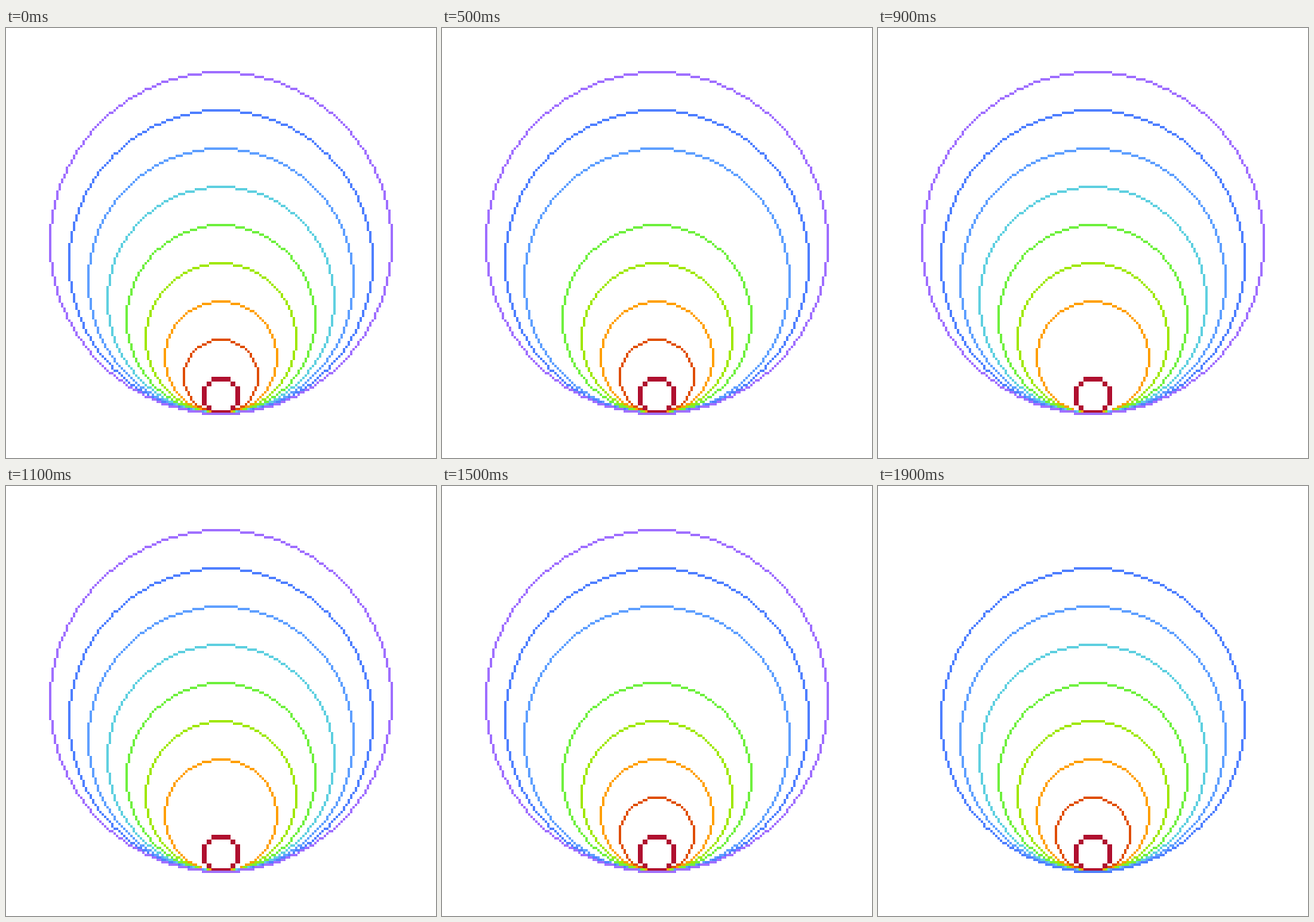
Write an HTML page with a canvas that moves like this. It is 540 px wide and 540 px high and loops after 1.92 s.

```html
<!DOCTYPE html>
<html lang="en">
<head>
<meta charset="utf-8">
<title>Nested rings</title>
<style>
  html, body { margin: 0; width: 100%; height: 100%; overflow: hidden; background: #fff; }
  canvas { display: block; width: 540px; height: 540px; }
</style>
</head>
<body>
<canvas id="stage" width="540" height="540"></canvas>
<script>
const ctx = document.getElementById('stage').getContext('2d');
const COLORS = ['#b01030', '#e05000', '#ffa000', '#a0e800', '#70f040',
                '#60d0e0', '#60a0ff', '#5080ff', '#a070ff'];
const LOOP = 1920, STEP = 100, BASE = 486, CENTER = 270;

// Midpoint circle made of square cells; the smallest ring uses double cells.
function ring(k) {
  const cell = k === 0 ? 6 : 3;
  const outer = 24 * (k + 1);
  const r = outer / cell;
  const cy = BASE - outer;
  const edge = n => (n > 0 ? n - 1 : n) * cell;
  const dot = (x, y) => ctx.fillRect(CENTER + edge(x), cy + edge(y), cell, cell);
  ctx.fillStyle = COLORS[k];
  for (let i = 1, j = r; i <= j; i++) {
    if (i * i + j * j - j > r * r) j--;
    for (const sx of [-1, 1]) for (const sy of [-1, 1]) {
      dot(sx * i, sy * j);
      dot(sx * j, sy * i);
    }
  }
}

// The gap runs inward to the smallest ring and back out,
// with a pause in which every ring is shown before the outermost blinks.
function hiddenRing(step) {
  const d = Math.abs(step - 10);
  if (d === 9) return 8;
  return d < 8 ? d : -1;
}

let shown = null;
function frame(now) {
  const hidden = hiddenRing(Math.floor((now % LOOP) / STEP));
  if (hidden !== shown) {
    shown = hidden;
    ctx.fillStyle = '#fff';
    ctx.fillRect(0, 0, 540, 540);
    COLORS.forEach((_, k) => { if (k !== hidden) ring(k); });
  }
  requestAnimationFrame(() => frame(performance.now() - start));
}
const start = performance.now();
frame(0);
</script>
</body>
</html>
```
